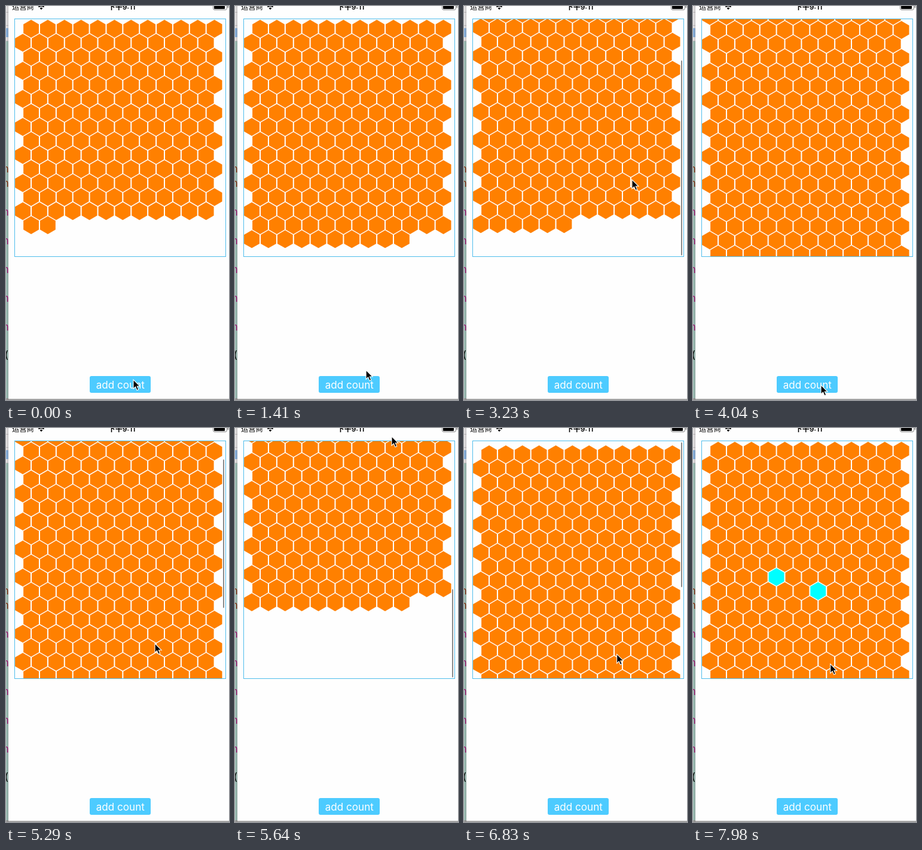
Write an HTML page that moves like this. It is 373 px wide and 658 px high and loops after 8 s.

```html
<!DOCTYPE html>
<html lang="zh">
<head>
<meta charset="utf-8">
<title>Honeycomb list</title>
<style>
  html, body { margin: 0; width: 100%; height: 100%; overflow: hidden; background: #fff; }
  svg { display: block; }
  .status { font: 12.3px "Noto Sans CJK SC", "Noto Sans CJK", sans-serif; }
  .clock { font-family: Inter, "Noto Sans CJK SC", "Noto Sans CJK", sans-serif; font-weight: 600; font-size: 12px; }
  .label { font: 17.1px Inter, sans-serif; fill: #fff; }
  .code { font: 17px "DejaVu Sans Mono", monospace; text-anchor: end; }
</style>
</head>
<body>
<svg width="373" height="658" viewBox="0 0 373 658">
  <defs>
    <clipPath id="view"><rect x="14.5" y="21.5" width="353" height="397.5"/></clipPath>
    <linearGradient id="edge"><stop offset="0" stop-color="#000" stop-opacity="0"/><stop offset="1" stop-color="#000" stop-opacity=".22"/></linearGradient>
  </defs>

  <!-- window behind -->
  <rect width="6" height="658" fill="#a9cbc2"/>
  <rect width="6" height="58" fill="#f1eff0"/>
  <path d="M0 10.5H5M0 32.5H5M0 58.5H5" stroke="#c9c6c8"/>
  <rect y="37" width="4" height="15" fill="#93bdea"/>
  <g id="code" class="code"></g>
  <rect y="655" width="373" height="3" fill="#a5a5a5"/>
  <rect width="4" height="658" fill="url(#edge)"/>

  <!-- phone -->
  <rect x="4" y="-5" width="369" height="661" fill="#fefefe"/>
  <text class="status" x="10" y="6">运营商</text>
  <path d="M59 6.2L56.6 3.6A3.6 3.6 0 0 1 61.4 3.6Z"/>
  <path d="M54.4 1.6A6.8 6.8 0 0 1 63.6 1.6" fill="none" stroke="#000" stroke-width="1.8"/>
  <text class="status clock" x="193.5" y="6" text-anchor="middle">下午9:11</text>
  <rect x="346.5" y="-5" width="23" height="11.5" rx="2.5" fill="none" stroke="#888"/>
  <rect x="348" y="-4" width="18" height="9" rx="1"/>
  <path d="M371.3 -2V3" stroke="#888" stroke-width="1.5"/>

  <g clip-path="url(#view)"><g id="cells" fill="#ff8000"></g></g>
  <rect x="14.5" y="21.5" width="353" height="397" fill="none" stroke="#4fbdec"/>
  <rect id="bar" x="363" width="2" rx="1" fill="#8c8c8c"/>

  <rect x="140" y="618" width="102" height="28" rx="3" fill="#4dcbff"/>
  <text class="label" x="191.3" y="638.5" text-anchor="middle">add count</text>
  <path id="cursor" d="M0 0V15.3L3.5 12 6 17.7 8.7 16.6 6.3 11H11Z" stroke="#fff" stroke-width="1.1"/>
</svg>
<script>
const LOOP = 8000, COLS = 12, STEP_X = 27.87, STEP_Y = 23.43, RADIUS = 14.92;
const VIEW = 398, TRACK = 392.5;
const MOVE = 340, RUBBER = 0.63, SETTLE = 110;
const $ = id => document.getElementById(id);
const clamp = (v, a, b) => Math.min(b, Math.max(a, v));

function add(parent, tag, attrs, text = "") {
  const el = document.createElementNS("http://www.w3.org/2000/svg", tag);
  for (const k in attrs) el.setAttribute(k, attrs[k]);
  el.textContent = text;
  return parent.appendChild(el);
}

for (let line = 0; line < 12; line += line ? 2 : 1)
  add($("code"), "text", { x: 5, y: 278 + line * 24, fill: line < 2 ? "#8f3210" : "#b0147c" }, "n");
add($("code"), "text", { x: 6, y: 589 }, "(");

// Each click on the button adds 20 cells
const clicks = [480, 1880, 4040, 4220, 4400, 4580, 4760];
const countAt = t => 170 + 20 * clicks.filter(c => c <= t).length;

// Even rows are shifted right by half a cell
const cells = Array.from({ length: countAt(LOOP) }, (_, i) => {
  const row = Math.floor(i / COLS);
  const x = 28.1 + (i % COLS + (row % 2 ? 0 : 0.5)) * STEP_X, y = 38 + row * STEP_Y;
  const points = [...Array(6).keys()].map(k => {
    const a = Math.PI * (k / 3 + 1 / 6);
    return `${x + RADIUS * Math.cos(a)},${y + RADIUS * Math.sin(a)}`;
  });
  return add($("cells"), "polygon", { points: points.join(" ") });
});
const picks = [[9 * COLS + 4, 7470], [10 * COLS + 6, 7720]];

// Pointer moves: start time, destination, and whether the list is dragged along
const moves = [
  [0, 213, 624], [720, 288, 390], [1120, 215, 621], [2300, 278, 378],
  [2820, 281, 290, true], [3300, 214, 633], [4870, 249, 361],
  [5280, 262, 14, true], [5690, 244, 113], [6120, 250, 423, true],
  [6600, 256, 375], [6870, 138, 248], [7500, 209, 270], [7740, 230, 396]
];
const startOf = i => i < moves.length ? moves[i][0] : LOOP;

function pointerAt(t) {
  const i = moves.findLastIndex(m => m[0] <= t);
  const [start, x, y] = moves[i], [, x0, y0] = moves[Math.max(0, i - 1)];
  const p = clamp((t - start) / Math.min(MOVE, startOf(i + 1) - start), 0, 1);
  const s = p * p * (3 - 2 * p);
  return [x0 + (x - x0) * s, y0 + (y - y0) * s];
}

const heightAt = t => (Math.ceil(countAt(t) / COLS) - 1) * STEP_Y + 44.5;
const maxAt = t => Math.max(0, heightAt(t) - VIEW);

// A drag carries the list, stretches past its ends, then springs back on release
function offsetAt(t) {
  let offset = 0;
  moves.forEach(([start, , , drag], i) => {
    if (!drag || t < start) return;
    const release = startOf(i + 1), held = Math.min(t, release - 1);
    const raw = offset + moves[i - 1][2] - pointerAt(held)[1];
    const rest = clamp(raw, 0, maxAt(held));
    offset = rest + (raw - rest) * RUBBER * Math.exp(-Math.max(0, t - release) / SETTLE);
  });
  return offset;
}

const shown = (t, from, to) => t < from ? 0 : clamp((to - t) / 100, 0, 1);

function draw(t) {
  const count = countAt(t), offset = offsetAt(t), [x, y] = pointerAt(t);
  cells.forEach((c, i) => c.style.display = i < count ? "" : "none");
  picks.forEach(([i, at]) => cells[i].style.fill = t >= at ? "#00ffff" : "");
  $("cells").setAttribute("transform", `translate(0 ${-offset})`);

  const max = maxAt(t);
  const over = Math.max(0, -offset, offset - max);
  const length = TRACK * Math.min(1, VIEW / heightAt(t)) - over;
  const bar = $("bar");
  bar.setAttribute("height", length);
  bar.setAttribute("y", 24 + (TRACK - length) * (max ? clamp(offset / max, 0, 1) : 0));
  bar.style.opacity = shown(t, 2820, 3750) || shown(t, 5280, 7290);
  $("cursor").setAttribute("transform", `translate(${x} ${y})`);
}

const start = performance.now();
(function tick() {
  draw((performance.now() - start) % LOOP);
  requestAnimationFrame(tick);
})();
</script>
</body>
</html>
```
